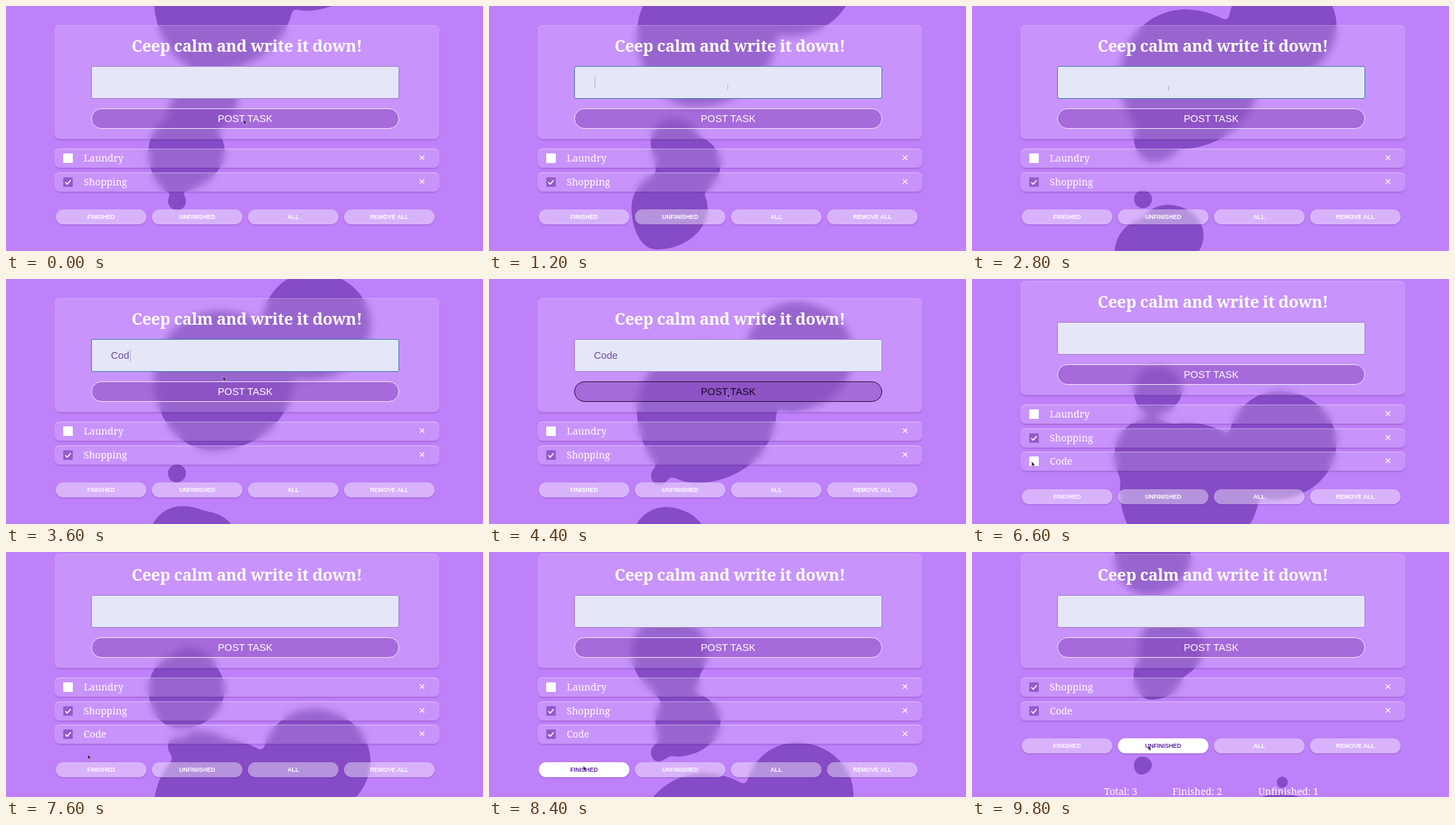
An HTML page that plays this animation: 700 px wide and 359 px high, repeating every 10000 ms.

```html
<!DOCTYPE html>
<html lang="en">
<head>
<meta charset="utf-8">
<title>Task list</title>
<style>
  html, body { margin: 0; width: 100%; height: 100%; overflow: hidden; background: #bf81f9; }
  body, .page { position: relative; }
  .page { width: 700px; height: 359px; color: #fff; font: 300 14.2px "Noto Serif", serif; }
  .page div, .page span { box-sizing: border-box; }
  .lava { position: absolute; left: 0; top: -300px; width: 700px; height: 1100px; filter: url(#goo); }
  .blob { position: absolute; top: 300px; background: #864bc6; }

  .glass {
    position: absolute; left: 71px; width: 565px;
    background: rgba(255,255,255,.15); border-radius: 8px;
    -webkit-backdrop-filter: blur(6px); backdrop-filter: blur(6px);
    box-shadow: 0 2px 3px -1px rgba(90,40,140,.4), inset 0 1px rgba(255,255,255,.2);
  }
  .panel { top: 28px; height: 167px; }
  .title {
    position: absolute; left: 0; right: 0; top: 14px; line-height: 32px; text-align: center;
    font-weight: 700; font-size: 23.6px; letter-spacing: -.36px; white-space: nowrap;
  }
  .input, .post {
    position: absolute; left: 54px; width: 452px;
    font: 14.6px "Liberation Sans", Arial, sans-serif;
  }
  .input {
    top: 60px; height: 48px; padding-left: 28px; line-height: 47px; border-radius: 3px;
    background: #e5e7f8; border: 1px solid #a079cc; color: #6d479f;
  }
  .input.focus { border-color: #3f78b4; }
  .caret {
    display: inline-block; width: 1px; height: 18px; margin-left: 1px;
    vertical-align: -4px; background: #a9aed6;
  }
  .post {
    top: 122px; height: 30px; line-height: 29px; text-align: center; border-radius: 15px;
    background: rgba(131,66,186,.5); border: 1px solid #f3e7ff;
  }
  .post.pressed { color: #120820; border-color: #241038; }

  .row { height: 28px; line-height: 28px; padding-left: 43px; box-shadow: 0 2px 3px -1px rgba(90,40,140,.4), inset 0 1px rgba(255,255,255,.4); }
  .row svg { position: absolute; left: 13px; top: 7px; }
  .row i {
    position: absolute; right: 20px; top: -1px; width: 11px; text-align: center;
    font: 300 17px/28px "Noto Sans", sans-serif;
  }
  .filter {
    position: absolute; width: 133px; height: 22px; border-radius: 11px; text-align: center;
    font: 700 8.7px/23px "Liberation Sans", Arial, sans-serif;
    background: rgba(255,255,255,.4); box-shadow: 0 1px 2px rgba(90,40,140,.35);
    -webkit-backdrop-filter: blur(3px); backdrop-filter: blur(3px);
  }
  .filter.on { background: #fff; color: #5d2ba0; }
  .total { position: absolute; font-size: 14px; line-height: 20px; white-space: nowrap; }
  .pointer { position: absolute; left: 0; top: 0; }
  .pointer .beam, .pointer.text .arrow { display: none; }
  .pointer.text .beam { display: inline; }
</style>
</head>
<body>
<svg width="0" height="0" style="position:absolute">
  <filter id="goo" x="0" y="0" width="100%" height="100%" color-interpolation-filters="sRGB">
    <feGaussianBlur stdDeviation="4.7"/>
    <feColorMatrix values="1 0 0 0 0  0 1 0 0 0  0 0 1 0 0  0 0 0 18 -7"/>
  </filter>
</svg>
<div class="page" id="page">
  <div class="lava" id="lava"></div>
  <div class="glass panel">
    <div class="title">Ceep calm and write it down!</div>
    <div class="input" id="input"><span id="typed"></span><span class="caret" id="caret"></span></div>
    <div class="post" id="post">POST TASK</div>
  </div>
</div>
<svg class="pointer" id="pointer" width="8" height="10">
  <path class="arrow" d="M.5 .5V7.5L2.2 6 3.5 8.6 4.6 8 3.4 5.6H5.6Z" fill="#2b1740" stroke="#e9dcf6" stroke-width=".5"/>
  <path class="beam" d="M1.5 0V7" stroke="#9a9fc4" stroke-dasharray="2 .7"/>
</svg>
<script>
const $ = id => document.getElementById(id);
const LOOP = 10000, STEP = 200;
const TIMES = [0, 1200, 2800, 4400, 6600, 8400, 9800];

// left, size, wobble at start and end of the loop, top at each of TIMES
const BLOBS = [
  { x: 245, size: 94,  wobble: [.6, 1],  y: [92, 188, 292, 372, 345, 230, 122] },
  { x: 377, size: 157, wobble: [.5, .3], y: [-151, -114, -47, 35, 190, 305, 380] },
  { x: 238, size: 70,  wobble: [.5, .8], y: [126, 166, 158, 148, 154, 175, 171] },
  { x: 210, size: 110, wobble: [1, .3],  y: [162, 246, 312, 335, 230, 118, -22] },
  { x: 238, size: 26,  wobble: [0, 1],   y: [273, 270, 270, 275, 288, 306, 325] },
  { x: 447, size: 17,  wobble: [.1, .5], y: [385, 390, 395, 395, 388, 368, 354] },
  { x: 218, size: 203, wobble: [.5, .2], y: [-108, -56, 6, 95, 236, 350, 430] }
];
const POINTER = {
  x: [348, 349, 287, 349, 87, 138, 258],
  y: [166, 116, 117, 167, 267, 313, 283]
};
const TASKS = ['Laundry', 'Shopping', 'Code'];
const FILTERS = ['FINISHED', 'UNFINISHED', 'ALL', 'REMOVE ALL'];
const TOTALS = [['Total: 3', 194], ['Finished: 2', 294], ['Unfinished: 1', 420]];

function add(parent, className, html = '') {
  const el = document.createElement('div');
  el.className = className;
  el.innerHTML = html;
  return parent.appendChild(el);
}

const blobs = BLOBS.map(b => {
  const el = add($('lava'), 'blob');
  el.style.left = b.x + 'px';
  el.style.width = el.style.height = b.size + 'px';
  return el;
});
const rows = TASKS.map(name => add($('page'), 'glass row',
  `<svg width="14" height="14"><rect width="14" height="14" rx="1"/>
   <path d="M3 7.2 5.8 10 11 4.2" fill="none" stroke="#fff" stroke-width="1.6"/></svg>${name}<i>×</i>`));
const filters = FILTERS.map((name, i) => {
  const el = add($('page'), 'filter', name);
  el.style.left = 73 + i * 141 + 'px';
  return el;
});
const totals = TOTALS.map(([text, x]) => {
  const el = add($('page'), 'total', text);
  el.style.left = x + 'px';
  return el;
});

// Smooth curve through the values at TIMES
function curve(values, t) {
  const last = TIMES.length - 1;
  let i = 0;
  while (i < last - 1 && t >= TIMES[i + 1]) i++;
  const slope = k => {
    const a = Math.max(k - 1, 0), b = Math.min(k + 1, last);
    return (values[b] - values[a]) / (TIMES[b] - TIMES[a]);
  };
  const span = TIMES[i + 1] - TIMES[i], u = (t - TIMES[i]) / span, v = 1 - u;
  return values[i] * (1 + 2 * u) * v * v + values[i + 1] * u * u * (3 - 2 * u)
    + span * (slope(i) * u * v * v - slope(i + 1) * u * u * v);
}

// Eased travel that rests at every stop
function travel(values, t) {
  let i = 0;
  while (i < TIMES.length - 2 && t >= TIMES[i + 1]) i++;
  const raw = (t - TIMES[i]) / (TIMES[i + 1] - TIMES[i]);
  const u = Math.min(1, Math.max(0, (raw - .2) / .6));
  return values[i] + (values[i + 1] - values[i]) * u * u * (3 - 2 * u);
}

function wobbleRadius(w) {
  const pct = n => 50 + n * w + '%';
  return [-8, 8, 20, -20].map(pct).join(' ') + ' / ' + [-5, -5, 5, 5].map(pct).join(' ');
}

function render(t) {
  const posted = t >= 4800, filtered = t >= 8600;
  const focused = t >= 800 && t < 4200;
  const scroll = posted ? 25 : 0;
  $('page').style.transform = `translateY(${-scroll}px)`;

  BLOBS.forEach((b, i) => {
    const [from, to] = b.wobble;
    blobs[i].style.transform = `translateY(${curve(b.y, t)}px)`;
    blobs[i].style.borderRadius = wobbleRadius(from + (to - from) * t / LOOP);
  });

  const letters = posted ? 0 : Math.min(4, Math.max(0, Math.floor((t - 3000) / 200)));
  $('typed').textContent = 'Code'.slice(0, letters);
  $('caret').style.visibility = focused && (letters || t % 1000 < 500) ? 'visible' : 'hidden';
  $('input').classList.toggle('focus', focused);
  $('post').classList.toggle('pressed', t >= 4400 && t < 4800);

  const checked = [false, true, t >= 7000];
  const shown = [!filtered, true, posted];
  let top = 209;
  rows.forEach((row, i) => {
    row.style.display = shown[i] ? '' : 'none';
    if (!shown[i]) return;
    row.style.top = top + 'px';
    row.querySelector('rect').setAttribute('fill', checked[i] ? '#935cc9' : '#fff');
    row.querySelector('path').style.display = checked[i] ? '' : 'none';
    top += 34.7;
  });

  const hovered = t >= 7800 && t < 9200 ? 0 : t >= 9200 ? 1 : -1;
  filters.forEach((el, i) => {
    el.style.top = top + 19.5 + 'px';
    el.classList.toggle('on', i === hovered);
  });
  totals.forEach(el => {
    el.style.top = top + 88 + 'px';
    el.style.display = posted ? '' : 'none';
  });

  const x = travel(POINTER.x, t), y = travel(POINTER.y, t);
  $('pointer').style.transform = `translate(${x}px, ${y}px)`;
  $('pointer').classList.toggle('text', !posted && y > 89 && y < 135);
}

const start = performance.now();
let drawn = -1;
function frame() {
  const t = Math.floor((performance.now() - start) % LOOP / STEP) * STEP;
  if (t !== drawn) render(drawn = t);
  requestAnimationFrame(frame);
}
frame();
</script>
</body>
</html>
```
